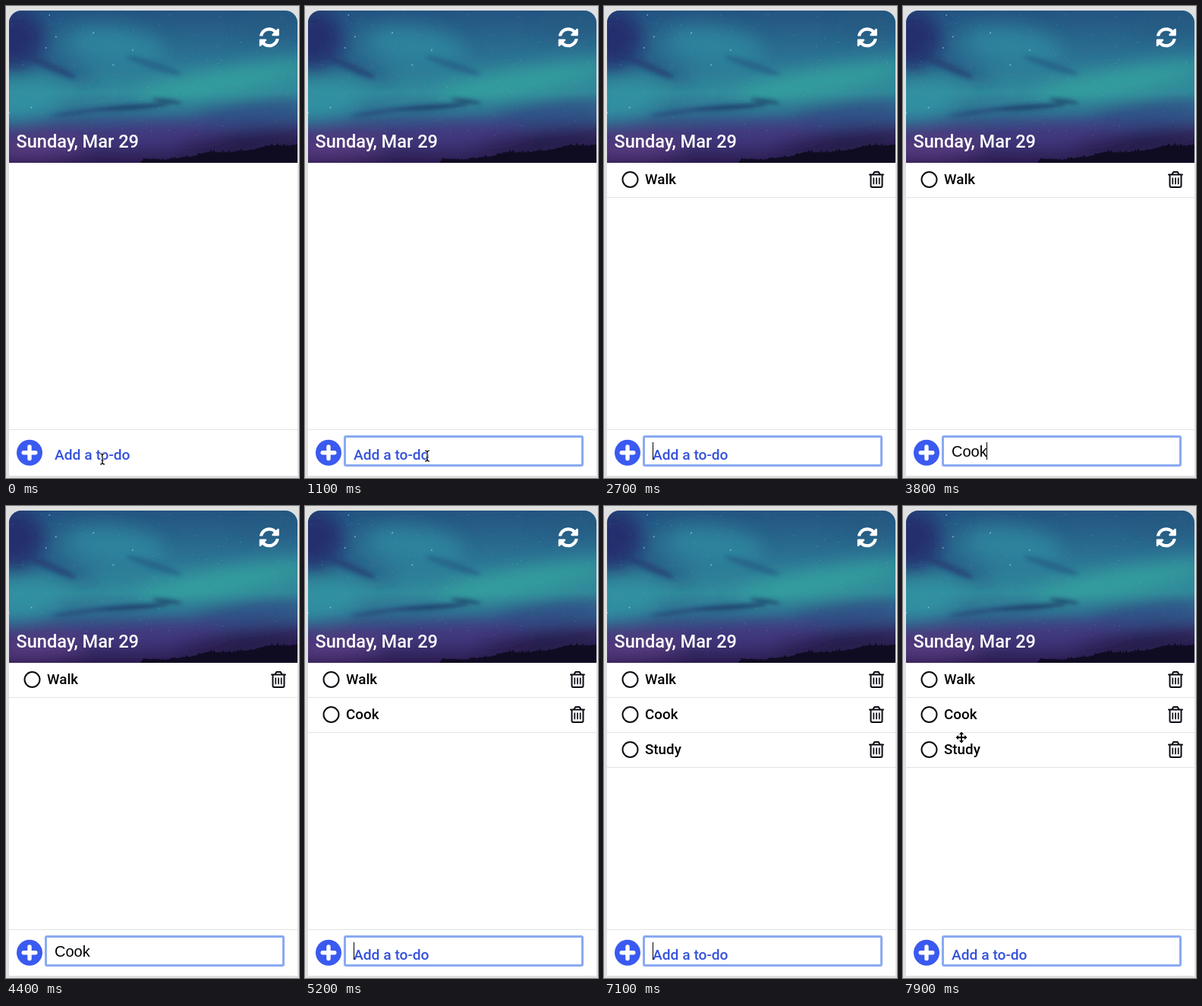
Recreate the animation shown at these times as an HTML page. Size 386 px wide and 620 px high, loop 8000 ms.

```html
<!DOCTYPE html>
<html lang="en">
<head>
<meta charset="utf-8">
<title>To-do list</title>
<style>
  html, body { margin: 0; width: 100%; height: 100%; overflow: hidden; background: #e0e0e0; }
  svg { display: block; }
  text { font: 500 18.8px Roboto, sans-serif; white-space: pre; }
  .date { font-size: 23.6px; fill: #fff; }
  .hint { font-size: 19.2px; fill: #3552dc; }
  .typed { font: 20px "Liberation Sans", Arial, sans-serif; }
  .rule { stroke: #e3e3e3; }
  .icon { fill: none; stroke: #0c0c14; stroke-width: 2; stroke-linecap: round; stroke-linejoin: round; }
  .thin { stroke-width: 1.7; }
</style>
</head>
<body>
<svg width="386" height="620" viewBox="0 0 386 620">
  <defs>
    <linearGradient id="sky" x1="0" y1="0" x2="0" y2="1">
      <stop offset="0" stop-color="#245482"/>
      <stop offset=".3" stop-color="#2b7193"/>
      <stop offset=".54" stop-color="#318c9c"/>
      <stop offset=".68" stop-color="#2f6a90"/>
      <stop offset=".8" stop-color="#3d3c7c"/>
      <stop offset="1" stop-color="#2c1c50"/>
    </linearGradient>
    <filter id="soft" x="-50%" y="-150%" width="200%" height="400%"><feGaussianBlur stdDeviation="12"/></filter>
    <filter id="wisp" x="-30%" y="-150%" width="160%" height="400%"><feGaussianBlur stdDeviation="2.500"/></filter>
    <clipPath id="card"><path d="M4 206V22a16 16 0 0 1 16-16H368a16 16 0 0 1 16 16V206z"/></clipPath>
    <g id="trash" class="icon">
      <path d="M350 221.500H368M354.500 221l1.800-3h5.400l1.800 3M351.500 222V236a2 2 0 0 0 2 2H364.500a2 2 0 0 0 2-2V222"/>
      <path class="thin" d="M355.300 226V233.500M359 226V233.500M362.700 226V233.500"/>
    </g>
    <path id="turn" d="M370.700 133.300C339.500 104 298.900 88 255.800 88c-77.400.1-144.300 53.200-162.700 126.900-1.400 5.300-6.200 9.100-11.700 9.100H24.100c-7.500 0-13.200-6.800-11.800-14.200C33.900 94.900 134.800 8 256 8c66.400 0 126.800 26.100 171.300 68.700L463 41c15.100-15.100 41-4.400 41 16.900V192c0 13.300-10.700 24-24 24H345.900c-21.300 0-32-25.900-16.900-41z"/>
  </defs>

  <path d="M4 617V22a16 16 0 0 1 16-16H368a16 16 0 0 1 16 16V617z" fill="#fff"/>

  <g clip-path="url(#card)">
    <rect x="4" y="6" width="380" height="200" fill="url(#sky)"/>
    <g id="glow" filter="url(#soft)"></g>
    <g id="clouds" filter="url(#wisp)"></g>
    <g id="stars" fill="#bfe4ff"></g>
    <path id="ridge" fill="#0f0c22"/>
  </g>
  <g transform="translate(346.800 41.300) scale(.0525) translate(-256 -256)" fill="#fff">
    <use href="#turn"/><use href="#turn" transform="rotate(180 256 256)"/>
  </g>
  <text class="date" x="13.500" y="186">Sunday, Mar 29</text>

  <g id="rows"></g>

  <path class="rule" d="M4 556.500H384"/>
  <circle cx="31" cy="586.700" r="17" fill="#3a5af0"/>
  <path d="M31 579V594.500M23.200 586.700H38.800" stroke="#fff" stroke-width="5.400" stroke-linecap="round"/>
  <rect id="focus" x="52.500" y="565.500" width="313" height="38" rx="1.500" fill="none" stroke="#8aaaf2" stroke-width="3"/>
  <text id="hint" class="hint" x="64" y="596">Add a to-do</text>
  <text id="typed" class="typed" x="64" y="592"></text>
  <path id="caret" d="M.5 573V596" stroke="#000"/>

  <g id="beam" fill="none">
    <path d="M-3-7Q0-7 0-4Q0-7 3-7M0-4.500V4.500M-3 7Q0 7 0 4Q0 7 3 7M-1.500 2H1.500" stroke="#fff" stroke-width="2.600"/>
    <path d="M-3-7Q0-7 0-4Q0-7 3-7M0-4.500V4.500M-3 7Q0 7 0 4Q0 7 3 7M-1.500 2H1.500" stroke="#000" stroke-width="1.200"/>
  </g>
  <path id="arrow" d="M0 0V15.500L3.600 12.200L6 17.800L8.500 16.700L6.200 11.300H11z" stroke="#fff"/>
  <path id="move" d="M0-7.500L3-4H1V-1H4V-3L7.500 0L4 3V1H1V4H3L0 7.500L-3 4H-1V1H-4V3L-7.500 0L-4-3V-1H-1V-4H-3z"
    stroke="#fff" stroke-width="1.600" paint-order="stroke"/>
</svg>

<script>
const LOOP = 8000, BLINK = 500, FOCUS = 500;
const tasks = [
  { name: 'Walk',  keys: [1300, 1600, 1800, 2000], done: 2500 },
  { name: 'Cook',  keys: [3100, 3300, 3500, 3700], done: 4800 },
  { name: 'Study', keys: [5600, 5800, 6000, 6200, 6400], done: 7000 }
];
const pointer = [
  { from: 200,  to: 500,  a: [127, 595], b: [140, 593] },
  { from: 600,  to: 1100, a: [140, 593], b: [161, 591] },
  { from: 7400, to: 7900, a: [161, 591], b: [77, 304] }
];

const $ = id => document.getElementById(id);
function add(parent, tag, attrs) {
  const el = document.createElementNS('http://www.w3.org/2000/svg', tag);
  for (const k in attrs) el.setAttribute(k, attrs[k]);
  return parent.appendChild(el);
}
const show = (el, on) => { el.style.display = on ? '' : 'none'; };

// Night sky
function ellipse(layer, cx, cy, rx, ry, tilt, fill, opacity) {
  add($(layer), 'ellipse', { cx, cy, rx, ry, fill, opacity, transform: `rotate(${tilt} ${cx} ${cy})` });
}
ellipse('glow', 12, 45, 40, 40, 20, '#25296a', .9);
ellipse('glow', 70, 78, 55, 8, 22, '#23457c', .7);
ellipse('glow', 145, 52, 65, 24, 8, '#31889f', .85);
ellipse('glow', 20, 128, 55, 20, -8, '#3294a4', .9);
ellipse('glow', 290, 98, 120, 15, -10, '#36a59f', .9);
ellipse('glow', 360, 20, 50, 18, -15, '#235a80', .6);
ellipse('glow', 330, 142, 80, 14, -6, '#2f4580', .8);
ellipse('glow', 40, 186, 70, 14, -4, '#66438c', .8);
ellipse('glow', 200, 170, 90, 12, -4, '#483784', .7);
ellipse('glow', 320, 182, 100, 16, -6, '#221844', .9);
ellipse('clouds', 165, 133, 50, 3.5, -4, '#203f6c', .85);
ellipse('clouds', 100, 139, 40, 3, -8, '#264a78', .75);
ellipse('clouds', 212, 125, 20, 3, 8, '#22486f', .8);
ellipse('clouds', 195, 78, 38, 5, 18, '#255f86', .65);
ellipse('clouds', 60, 80, 36, 5, 24, '#24396f', .6);

let seed = 29;
const rand = () => (seed = (seed * 16807) % 2147483647) / 2147483647;
for (let i = 0; i < 190; i++) {
  const big = i % 24 === 0;
  add($('stars'), 'circle', {
    cx: (4 + rand() * 380).toFixed(1), cy: (6 + rand() * 165).toFixed(1),
    r: big ? .9 : .5, opacity: (big ? .65 : .1 + rand() * .35).toFixed(2)
  });
}

// Hill line with bushy treetops
let ridge = 'M176 207';
for (let x = 180; x <= 384; x += 4) {
  const y = 205 - (x - 180) * .11 - Math.max(0, Math.sin(x / 13)) * 3;
  ridge += `L${x} ${y.toFixed(1)}L${x + 2} ${(y - rand() * 4).toFixed(1)}`;
}
$('ridge').setAttribute('d', ridge + 'L386 180V207z');

tasks.forEach((task, i) => {
  const row = task.row = add($('rows'), 'g', { transform: `translate(0 ${i * 46})` });
  add(row, 'circle', { cx: 34.5, cy: 228, r: 10, class: 'icon' });
  add(row, 'text', { x: 54, y: 234 }).textContent = task.name;
  add(row, 'use', { href: '#trash' });
  add(row, 'path', { d: 'M4 251.5H384', class: 'rule' });
});

function drawPointer(t) {
  const visible = t < tasks[0].keys[0] || t >= pointer[2].from;
  const leg = pointer.filter(p => t >= p.from).pop() || pointer[0];
  const k = Math.min(1, Math.max(0, (t - leg.from) / (leg.to - leg.from)));
  const ease = 1 - (1 - k) ** 2;
  const [x, y] = leg.a.map((v, i) => v + (leg.b[i] - v) * ease);
  const kind = y > 564 ? 'beam' : y > 343 ? 'arrow' : 'move';
  for (const id of ['beam', 'arrow', 'move']) {
    show($(id), visible && id === kind);
    $(id).setAttribute('transform', `translate(${x.toFixed(1)} ${y.toFixed(1)})`);
  }
}

function draw(t) {
  let text = '', last = FOCUS;
  for (const { name, keys, done, row } of tasks) {
    show(row, t >= done);
    const hits = keys.filter(k => t >= k);
    if (hits.length) last = t >= done ? done : hits[hits.length - 1];
    if (t < done) text += name.slice(0, hits.length);
  }
  $('typed').textContent = text;
  show($('hint'), !text);
  show($('focus'), t >= FOCUS);
  show($('caret'), t >= FOCUS && Math.floor((t - last) / BLINK) % 2 === 0);
  const width = text ? $('typed').getComputedTextLength() : 0;
  $('caret').setAttribute('transform', `translate(${Math.floor(64 + width)} 0)`);
  drawPointer(t);
}

const start = performance.now();
function tick() {
  draw((performance.now() - start) % LOOP);
  requestAnimationFrame(tick);
}
tick();
</script>
</body>
</html>
```
